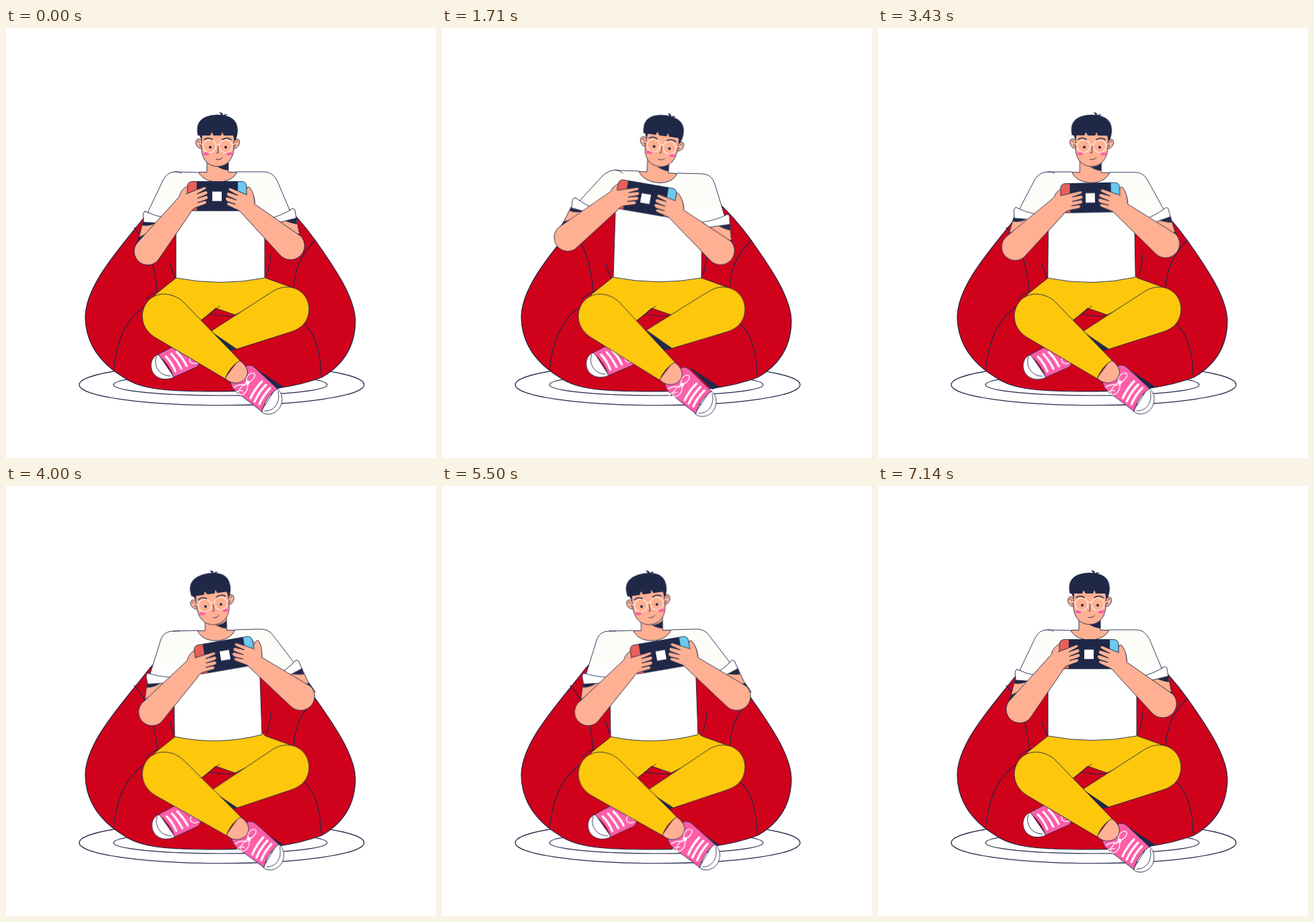
Animation, 640 px wide and 640 px high, one loop 7210 ms. Source, as an HTML page without scripts:

```html
<!DOCTYPE html>
<html lang="en">
<head>
<meta charset="utf-8">
<title>Playing on a bean bag</title>
<style>
html, body { margin: 0; width: 100%; height: 100%; overflow: hidden; background: #fff; }
svg { display: block; width: 100%; height: 100%; }
path, circle, ellipse, rect { stroke-linejoin: round; stroke-linecap: round; }

.ink { stroke: #202848; stroke-width: .9; }
.seam { fill: none; stroke: #202848; stroke-width: 1.2; }
.skin { fill: #ffb092; }
.navy { fill: #202848; }
.pants { fill: #fdc70c; }
.pink { fill: #ff5da8; }
.white { fill: #fff; }
.line { fill: none; }
.lace { fill: none; stroke: #fff; stroke-width: 1.3; }
.bar { fill: none; stroke: #fff; stroke-width: 3.2; }

/* rest, lean right, lean left, rest */
.sway { animation: sway 7.21s cubic-bezier(.4, 0, .6, 1) infinite; }
@keyframes sway {
  0%, 7.63%, 87.24%, 100% { transform: none; }
  19%, 41.47% { transform: var(--a); }
  52.84%, 75.87% { transform: var(--b); }
}
.head { transform-origin: 315px 214px; animation-delay: -7.16s;
  --a: translate(6.5px, 0px) rotate(8deg); --b: translate(-2px, 0px) rotate(-8deg); }
.neck { transform-origin: 315px 214px;
  --a: translate(6px, .5px) rotate(3deg); --b: translate(-2.5px, .5px) rotate(-1deg); }
.console { transform-origin: 314px 250.5px;
  --a: translate(-11px, 3.5px) rotate(9.8deg); --b: translate(12px, 1.5px) rotate(-9.8deg); }
.fore-l { transform-origin: 211px 333px;
  --a: translate(-24px, -20.5px) rotate(13deg); --b: translate(6.5px, 4px) rotate(4.5deg); }
.fore-r { transform-origin: 424px 324px;
  --a: translate(-9px, 7.5px) rotate(-1.4deg); --b: translate(15px, -11px) rotate(-4.1deg); }
.upper-l { transform-origin: 220px 282px;
  --a: translate(-11px, -18px) rotate(12deg); --b: translate(5px, 4px) rotate(-7deg); }
.upper-r { transform-origin: 429px 269px;
  --a: translate(-2px, 9px) rotate(6deg); --b: translate(5px, -10px) rotate(-14deg); }
.leg { transform-origin: 235px 428px; --a: rotate(1.3deg); --b: rotate(-1.2deg); }
.foot { transform-origin: 415px 418px; --a: rotate(.9deg); --b: rotate(-.9deg); }

.thumb { animation: thumb .90125s ease-in-out infinite; }
.thumb-l { transform-origin: 266px 260px; --down: rotate(5deg); }
.thumb-r { transform-origin: 364px 260px; --down: rotate(-12deg); }
@keyframes thumb {
  0%, 100% { transform: var(--down); }
  50% { transform: rotate(0deg); }
}

.shirt { animation: shirt 7.21s cubic-bezier(.4, 0, .6, 1) infinite; }
@keyframes shirt {
  0%, 7.63%, 87.24%, 100% { d: path("M236 287 L211 278 L212 272 L234 226 Q240 214 252 214 L287 215 C296 234 336 234 344 214 L384 214 Q397 214 404 228 L423 273 L394 288 L385 300 L385 372 Q320 385 253 372 L253 285 Z M252 214 Q258 214 261 216"); }
  19%, 41.47% { d: path("M221 271 L202 263 L206 256 L238 221 Q250 209 264 212 L293 213 C300 233 342 238 350 216 L387 217 Q401 217 406 232 L421 281 L390 293 L387 310 L386 372 Q322 384 255 371 L258 275 Z M258 211 Q265 212 269 216"); }
  52.84%, 75.87% { d: path("M242 289 L214 285 L215 278 L231 227 Q236 216 249 216 L285 215 C292 235 332 236 341 214 L376 213 Q391 212 398 223 L431 266 L409 283 L378 285 L381 370 Q316 387 251 373 L250 300 Z M249 216 Q254 215 258 216"); }
}
</style>
</head>
<body>
<svg viewBox="0 0 640 640">
  <defs>
    <linearGradient id="cloth" gradientUnits="userSpaceOnUse" x1="0" y1="215" x2="0" y2="300">
      <stop offset=".5" stop-color="#fcfdf9"/><stop offset="1" stop-color="#fff"/>
    </linearGradient>
  </defs>

  <!-- floor rings and bean bag -->
  <g class="seam">
    <ellipse cx="321" cy="531" rx="212" ry="30.5"/>
    <ellipse cx="319" cy="531" rx="159" ry="16"/>
    <path fill="#d0021b" d="M214 271 C175 322 118 380 118 431 C119 480 152 506 175 520 C200 538 240 541 310 541 C395 541 435 533 470 520 C505 500 520 470 520 435 C519 401 490 358 461 317 C443 292 424 270 400 250 L235 250 Z"/>
    <path d="M191 297 C206 313 221 340 225 393 M212 411 C175 432 165 470 160 508 M244 351 Q247 363 253 373 M460 316 C437 340 430 360 428 388 M394 337 Q393 354 388 368 M443 440 C462 455 468 485 469 517 M302 426 Q320 429 340 429 M208 404 Q216 395 228 392"/>
  </g>

  <!-- far shoe -->
  <g class="sway foot">
    <path class="white ink" d="M227 486 C214 490 213 507 221 516 C229 524 239 524 250 520 Z"/>
    <path class="line ink" d="M224 489 C219 501 227 518 245 518"/>
    <path class="pink ink" d="M226 486 L253 472 L292 492 L285 504 L249 520 C246 507 237 496 226 486 Z"/>
    <path class="bar" d="M238 489 Q247 498 252 511 M246 485 Q255 495 261 507 M254 482 Q263 491 269 503"/>
    <path class="lace" d="M275 490 C270 496 277 502 285 498 M273 487 L284 494"/>
  </g>

  <!-- trousers -->
  <path class="pants ink" d="M253 372 L262 362 L376 362 L386 372 L425 386 L341 427 L312 417 L290 436 L225 425 L222 397 Z"/>
  <path class="line ink" d="M290 435 L318 414"/>
  <g class="sway foot">
    <path class="pants ink" d="M304 452 L397 392 C425 375 452 394 451 420 C450 437 440 447 425 452 L343 478 Z"/>
    <path class="navy" d="M303 450 L344 478 L330 482 Z"/>
  </g>
  <path class="navy" d="M366 503 L413 534 L402 538 Z"/>
  <g class="sway leg">
    <path class="white ink" d="M402 536 C412 541 414 557 406 567 C399 576 386 577 380 571 Z"/>
    <path class="line ink" d="M405 541 C409 557 399 571 385 570"/>
    <path class="pink ink" d="M334 527 L359 502 Q366 501 371 506 L404 537 C392 545 384 557 381 571 L342 541 Q335 535 334 527 Z"/>
    <path class="bar" d="M364 551 Q371 536 381 526 M370 556 Q377 541 387 531 M377 560 Q383 546 393 536"/>
    <path class="lace" d="M359 528 C355 519 364 512 369 514 C373 517 367 526 359 528 C362 537 356 546 349 546 C342 544 349 533 359 528 M357 532 Q347 529 339 535 M352 540 Q343 538 340 546"/>
    <circle class="white" cx="359.5" cy="528" r="3"/>
    <path class="skin ink" d="M326 521 L346 494 C355 499 361 508 359 516 C355 530 336 533 326 521 Z"/>
    <path class="pants ink" d="M262 406 C240 388 208 394 203 425 C202 440 208 451 221 460 L326 522 Q333 504 348 495 Z"/>
  </g>

  <!-- upper arms -->
  <g class="sway upper-l">
    <path class="skin ink" d="M204 288 L198 311 L192 328 L228 305 L234 288 Z"/>
    <path class="navy" d="M204 289 L226 289 Q215 296 203 294 Z M215 303 L198 311 L193 322 Z"/>
  </g>
  <g class="sway upper-r">
    <path class="skin ink" d="M402 288 L432 282 L436 303 L443 322 L415 308 Z"/>
    <path class="navy" d="M415 287 L432 282 L433 292 Q425 291 415 287 Z M423 303 Q432 307 437 306 L443 320 Q436 309 423 303 Z"/>
  </g>

  <!-- neck and shirt -->
  <g class="sway neck">
    <path class="skin ink" d="M288 214.5 L299 214.5 L299 190 L331 190 L331 214.5 L343 214.5 L343 232 L288 232 Z"/>
    <path class="navy" d="M314 206 Q324 207 331 200 L331 212 Q322 211 314 206 Z"/>
  </g>
  <path class="shirt ink" fill="url(#cloth)"/>
  <g class="sway upper-l">
    <path class="white ink" d="M207 273 Q204 274 204 279 L205 289 L234 291 L239 283 Q222 280 207 273 Z"/>
  </g>
  <g class="sway upper-r">
    <path class="white ink" d="M391 284 Q411 279 426 269 Q429 268 430 271 L432 283 L400 291 Z"/>
  </g>

  <!-- head -->
  <g class="sway head">
    <g class="skin ink">
      <path d="M292 168 C286 162 281 166 283 173 C285 178 288 180 292 179 Z"/>
      <path d="M338 168 C345 162 349 166 347 173 C345 178 342 180 338 179 Z"/>
      <path d="M291 150 L291 180 C292 198 303 206 315 206 C328 206 338 196 339 180 L340 150 Z"/>
      <path class="line" d="M285 168 Q290 170 289 176 M345 168 Q340 170 341 176"/>
    </g>
    <path class="navy" d="M285.5 160 C281 140 292 129.5 315 129 C338 129.5 348 140 344 160 L341 169 L338 160 L324 160 L322 155 L320 160 L309 160 L306 155 L304 160 L292 160 L291 167 L288 160 Z"/>
    <path class="navy" d="M320 133 C321 129 319 127 317 126 C322 125 323 128 323 131 C324 128 327 128 330 129 C326 130 324 132 324 134 Z"/>
    <ellipse class="pink" cx="298" cy="187.3" rx="4.6" ry="2.3"/>
    <ellipse class="pink" cx="332.5" cy="187.3" rx="4.6" ry="2.3"/>
    <g fill="none" stroke="#fff0e6" stroke-width="1.2">
      <circle cx="303" cy="176" r="9.5"/><circle cx="327" cy="176" r="9.5"/>
      <path d="M312.5 174 Q315 172 317.5 174 M293.5 174 L286 171 M336.5 174 L344 171"/>
    </g>
    <circle class="navy" cx="304" cy="177.5" r="2"/><circle class="navy" cx="327" cy="177.5" r="2"/>
    <path class="line ink" d="M316 176 L315.5 186 L313.5 186 M313 195.5 Q319 197 322 193"/>
    <path class="seam" style="stroke-width:1.6" d="M295 166 Q301 162 307 166 M322 166 Q329 162 335 166"/>
  </g>

  <!-- hands behind, console, hands in front -->
  <g class="sway fore-l">
    <path class="skin ink thumb thumb-l" d="M257 254 C257 244 264 235 273 233 L282 262"/>
  </g>
  <g class="sway fore-r">
    <path class="skin ink" d="M370 262 C371 251 366 242 357 236 L348 260"/>
    <path class="skin ink thumb thumb-r" d="M370 262 C372 250 370 241 366 236 C361 238 357 246 355 256"/>
  </g>
  <g class="sway console">
    <path class="ink" fill="#e8605a" d="M284 228.5 L277 228.5 Q270 229 270 236 L270 265 Q270 272 277 272 L284 272 Z"/>
    <path class="ink" fill="#6bc9ef" d="M345 228.5 L351 228.5 Q358 229 358 236 L358 265 Q358 272 351 272 L345 272 Z"/>
    <rect class="navy" x="284" y="228" width="61" height="44.5" rx="1"/>
    <rect class="white" x="307" y="243.5" width="14" height="14"/>
  </g>
  <g class="sway fore-l">
    <path class="skin ink" d="M268 247 L295 236.5 Q300 236 297 240 L284 247 L297 242.5 Q302 243 299 247.5 L285 253.5 L298 249.5 Q303 251 299 255 L285 260 L296 257 Q301 258 297 262 L283 267 Q277 269 274 276 L226 346 A20 20 0 0 1 196 319 L257 252"/>
  </g>
  <g class="sway fore-r">
    <path class="skin ink" d="M358 248 L334 238 Q329 238 332 242 L345 249 L331 244.5 Q326 246 330 250 L343 256 L329 251.5 Q324 253 329 258 L342 262.5 L331 259.5 Q326 261 331 264.5 L343 270 Q348 271 352 277 L408 338 A20 20 0 0 0 439 310 L370 262"/>
  </g>
</svg>
</body>
</html>
```
